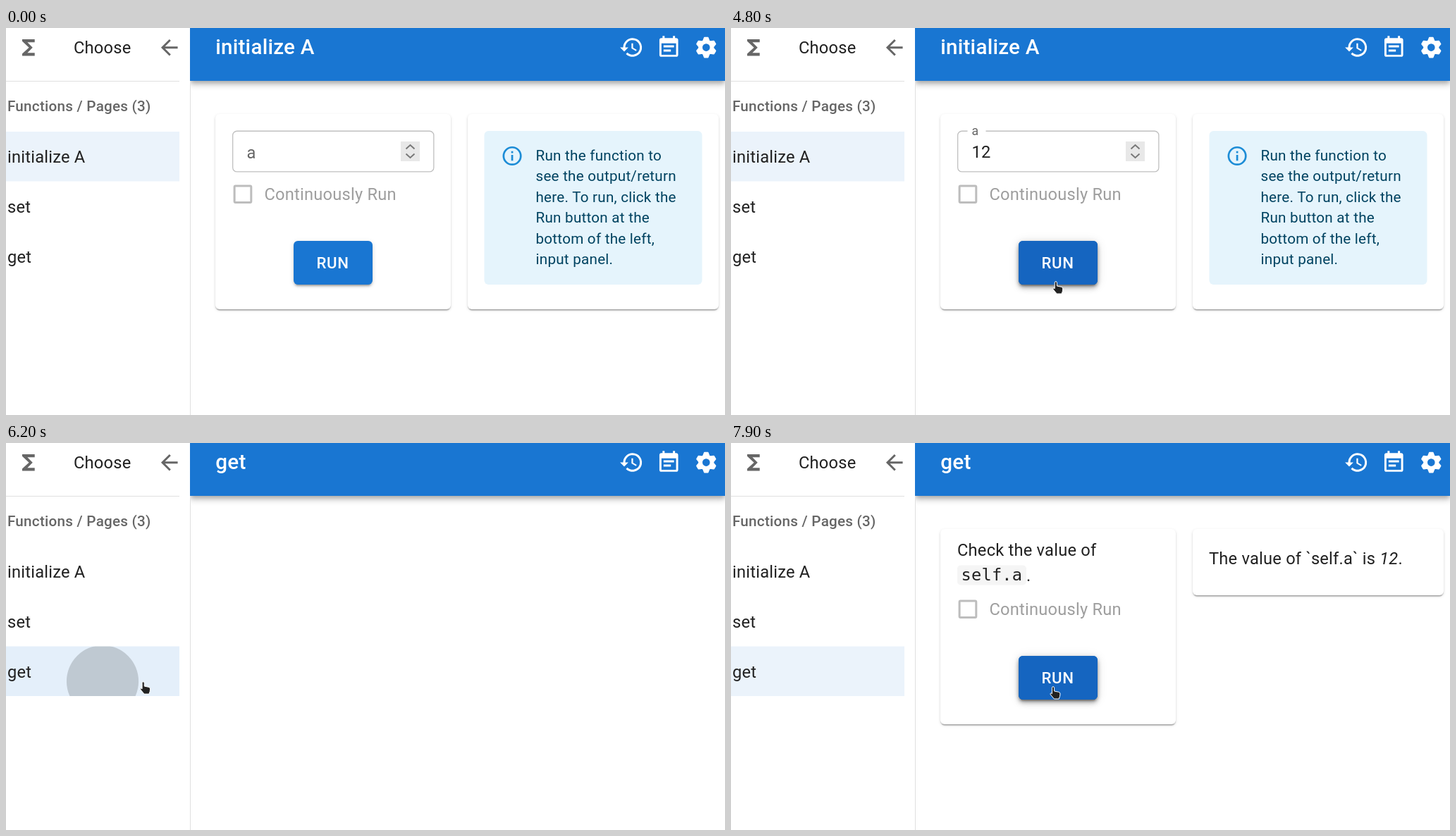
Write an HTML page that moves like this. It is 1020 by 549 pixels and loops after 8000 ms.

```html
<!DOCTYPE html>
<html lang="en">
<head>
<meta charset="utf-8">
<title>Function runner</title>
<style>
html, body { margin: 0; width: 100%; height: 100%; overflow: hidden; background: #fff; }
div, #art { position: absolute; box-sizing: border-box; }
#bar { left: 261px; top: 0; right: 0; height: 75px; background: #1976d2;
  box-shadow: 0 3px 6px -1.5px #0003, 0 6px 7.4px #00000024, 0 1.5px 15px #0000001f; }
#side { left: 0; top: 0; width: 261px; height: 100%; background: #fff; }
.card { top: 122px; height: 277px; background: #fff; border-radius: 6px;
  box-shadow: 0 3px 1.5px -1.5px #0003, 0 1.5px 1.5px #00000024, 0 1.5px 4.4px #0000001f; }
#inputCard { left: 297px; width: 334px; }
#outputCard { left: 655px; width: 356px; }
.button { left: 408px; top: 302px; width: 112px; height: 62px; border-radius: 6px; background: #1976d2;
  box-shadow: 0 4.4px 1.5px -3px #0003, 0 3px 3px #00000024, 0 1.5px 7.4px #0000001f; }
#hover { background: #1565c0;
  box-shadow: 0 3px 6px -1.5px #0003, 0 6px 7.4px #00000024, 0 1.5px 15px #0000001f; }
#art { left: 0; top: 0; width: 100%; height: 100%; overflow: hidden; }
text { font: 23.66px Roboto, sans-serif; letter-spacing: .00938em; fill: #212121; white-space: pre; }
text.title { font-size: 29.58px; font-weight: 500; letter-spacing: .0075em; fill: #fff; }
text.head { font-size: 20.7px; font-weight: 500; letter-spacing: .0107em; fill: #666; }
text.run { font-size: 22.2px; font-weight: 500; letter-spacing: .0286em; fill: #fff; }
#alert text { font-size: 20.7px; letter-spacing: .0107em; fill: #014361; }
text.code { font-family: "DejaVu Sans Mono", monospace; }
.pill { fill: #f5f5f5; }
</style>
</head>
<body>
<div id="bar"></div>
<div id="side"></div>
<div id="page">
  <div class="card" id="inputCard"></div>
  <div class="card" id="outputCard"></div>
  <div class="button"></div>
  <div class="button" id="hover"></div>
</div>

<svg id="art">
  <!-- sidebar -->
  <path d="M0 75.5H246M261.5 75V549" stroke="#e0e0e0"/>
  <rect id="rowInit" y="147" width="246" height="70.5" fill="#1976d2"/>
  <rect id="rowGet" y="288.5" width="246" height="70.5" fill="#1976d2"/>
  <svg y="288.5" width="246" height="70.5"><circle id="rowRipple" cx="137" cy="49.5"/></svg>
  <g fill="#666">
    <path transform="translate(14.1 10) scale(1.479)" d="M18 4H6v2l6.5 6L6 18v2h12v-3h-7l5-5-5-5h7z"/>
    <path transform="translate(214 10) scale(1.479)" d="M20 11H7.83l5.59-5.59L12 4l-8 8 8 8 1.41-1.41L7.83 13H20z"/>
  </g>
  <text x="96" y="36">Choose</text>
  <text class="head" x="2" y="118">Functions / Pages (3)</text>
  <text x="2" y="191">initialize A</text>
  <text x="2" y="262">set</text>
  <text x="2" y="333">get</text>

  <!-- app bar -->
  <text class="title" id="title" x="297.3" y="37"></text>
  <g fill="#fff">
    <path transform="translate(869.6 9.8) scale(1.479)" d="M13 3a9 9 0 0 0-9 9H1l3.9 3.9.1.1L9 12H6a7 7 0 1 1 2.06 4.94l-1.42 1.42A9 9 0 1 0 13 3zm-1 5v5l4.28 2.54.72-1.21-3.5-2.08V8z"/>
    <path transform="translate(922.5 9.8) scale(1.479)" d="M17 10H7v2h10zm2-7h-1V1h-2v2H8V1H6v2H5a2 2 0 0 0-2 2v14a2 2 0 0 0 2 2h14a2 2 0 0 0 2-2V5a2 2 0 0 0-2-2zm0 16H5V8h14zm-5-5H7v2h7z"/>
    <g id="gear" transform="translate(993.3 27.6) scale(1.479)">
      <circle r="5.5" fill="none" stroke="#fff" stroke-width="3.8"/>
    </g>
  </g>

  <g id="content">
    <rect x="324.1" y="223.9" width="23.7" height="23.7" rx="1.5" fill="none" stroke="#bdbdbd" stroke-width="3"/>
    <text x="366.5" y="244" style="fill:#9e9e9e">Continuously Run</text>
    <svg x="408" y="302" width="112" height="62"><circle id="runRipple" fill="#fff"/></svg>
    <text class="run" x="440.6" y="341">RUN</text>

    <g id="initForm">
      <rect id="border" rx="6" fill="none"/>
      <rect id="notch" y="143.5" height="5" fill="#fff"/>
      <text id="label">a</text>
      <text id="value" x="341.6" y="184"></text>
      <rect id="caret" y="162.5" width="1.6" height="27" fill="#111"/>
      <rect x="560" y="161" width="27" height="28" fill="#e8e8e8"/>
      <path d="M567.5 171.5l6-5.5 6 5.5M567.5 178.5l6 5.5 6-5.5" fill="none" stroke="#777" stroke-width="1.9"/>
    </g>
    <g id="getForm">
      <text x="321" y="160">Check the value of</text>
      <rect class="pill" x="321" y="173.5" width="98" height="28" rx="5"/>
      <text class="code" x="326.5" y="195">self.a</text>
      <text x="419" y="195.5">.</text>
    </g>

    <g id="alert">
      <rect x="678.5" y="146" width="309" height="218" rx="6" fill="#e5f4fc"/>
      <g transform="translate(701.8 165.2) scale(1.356)" fill="#1c8cd6">
        <circle cx="12" cy="12" r="9" fill="none" stroke="#1c8cd6" stroke-width="2"/>
        <path d="M11 7h2v2h-2zm0 4h2v6h-2z"/>
      </g>
    </g>
    <g id="initResult">
      <rect class="pill" x="678" y="150" width="98" height="28" rx="5"/>
      <text class="code" x="683.5" y="171.5">self.a</text>
      <text x="782" y="172">has been</text>
      <text x="678" y="207.5">initialized to 12</text>
    </g>
    <text id="getResult" x="678" y="172">The value of `self.a` is <tspan font-style="italic">12</tspan>.</text>
  </g>

  <!-- pointers, hot spot at 0,0 -->
  <g id="pointer" stroke="#fff" fill="#222" stroke-linejoin="round">
    <path id="arrow" d="M0 0V14.5l3.4-3 2.6 5.8 2.5-1.1L6 10.6h4.4z"/>
    <path id="hand" d="M-1.6 1.3a1.6 1.6 0 0 1 3.2 0V6l6 1.2q2.6.6 2.4 2.8l-.5 3.5-1.3 3.5H1.4l-5.2-6.2q-.8-2 1-2l1.2.9z"/>
    <g id="beam" fill="none">
      <path d="M-3-7.5H-1L0-6.5 1-7.5H3M0-6.5V6.5M-3 7.5H-1L0 6.5 1 7.5H3" stroke-width="3"/>
      <path d="M-3-7.5H-1L0-6.5 1-7.5H3M0-6.5V6.5M-3 7.5H-1L0 6.5 1 7.5H3" stroke="#222" stroke-width="1.2"/>
    </g>
  </g>
</svg>

<script>
const LOOP = 8000, FOCUS = 1880, BLUR = 4790, GET_CLICK = 6040, SWITCH = 6080;
const el = {};
document.querySelectorAll('[id]').forEach(node => el[node.id] = node);

const add = (parent, tag, attrs) => {
  const node = document.createElementNS('http://www.w3.org/2000/svg', tag);
  set(node, attrs);
  return parent.appendChild(node);
};
const set = (node, attrs) => { for (const key in attrs) node.setAttribute(key, attrs[key]); };
const show = (node, on) => node.style.display = on ? '' : 'none';
const clamp = x => Math.min(1, Math.max(0, x));
const within = (v, a, b) => v >= a && v < b;
const mix = (a, b, k) => a + (b - a) * k;

for (let i = 0; i < 6; i++)
  add(el.gear, 'path', { d: 'M-3.6-6L-2.3-9.4Q-2.1-10-1.6-10H1.6Q2.1-10 2.3-9.4L3.6-6z', transform: `rotate(${i * 60})` });
['Run the function to', 'see the output/return', 'here. To run, click the', 'Run button at the', 'bottom of the left,', 'input panel.']
  .forEach((line, i) => add(el.alert, 'text', { x: 751.5, y: 187.6 + i * 29.55 }).textContent = line);

// cubic-bezier(.4, 0, .2, 1)
function ease(x) {
  x = clamp(x);
  let lo = 0, hi = 1;
  for (let i = 0; i < 18; i++) {
    const s = (lo + hi) / 2, r = 1 - s;
    if (1.2 * r * r * s + .6 * r * s * s + s ** 3 < x) lo = s; else hi = s;
  }
  return lo * lo * (3 - 2 * lo);
}
const pulse = (t, from, to, fade) => ease((t - from) / fade) - ease((t - to) / fade);

// time, x, y
const path = [
  [900, 317, 376], [1300, 352, 285], [1700, 401.3, 199.5], [3100, 401.3, 199.5], [3890, 429, 230], [4350, 455, 318],
  [4700, 461, 360], [5250, 460, 360], [5600, 141, 339], [5700, 137, 338], [6110, 137, 338],
  [6200, 194, 339], [6500, 393, 358], [6900, 407, 354], [7100, 470, 333], [7800, 470, 333], [7900, 457, 346]
];
function pointerAt(t) {
  const i = path.findIndex(p => p[0] > t);
  if (i < 0) return path[path.length - 1].slice(1);
  if (i === 0) return path[0].slice(1);
  const [a, b] = [path[i - 1], path[i]];
  const k = (t - a[0]) / (b[0] - a[0]);
  return [mix(a[1], b[1], k), mix(a[2], b[2], k)];
}

function ripple(node, t, start, release, radius) {
  const grow = ease((t - start) / 550);
  set(node, { r: t < start ? 0 : radius * grow, opacity: (.1 + .2 * grow) * (1 - ease((t - release) / 550)) });
}

function draw() {
  const t = performance.now() % LOOP;
  const onGet = t >= SWITCH;
  const [x, y] = pointerAt(t);
  const overField = !onGet && t >= 900 && within(x, 321, 608) && within(y, 146, 205);
  const overButton = within(x, 408, 520) && within(y, 302, 364);
  const overRow = x < 246 && within(y, 147, 359);

  // pages
  el.title.textContent = onGet ? 'get' : 'initialize A';
  const loaded = !within(t, SWITCH, 6350);
  show(el.page, loaded);
  show(el.content, loaded);
  show(el.initForm, !onGet);
  show(el.getForm, onGet);
  const initDone = within(t, 4980, SWITCH), getDone = t >= 7420;
  show(el.initResult, initDone);
  show(el.getResult, getDone);
  show(el.alert, !initDone && !getDone);
  el.outputCard.style.height = (initDone ? 129 : getDone ? 94 : 277) + 'px';

  // sidebar rows
  const chosen = ease((t - SWITCH) / 150);
  set(el.rowInit, { opacity: .085 * (1 - chosen) });
  set(el.rowGet, { opacity: chosen * (.085 + .035 * (1 - ease((t - 6240) / 150))) });
  ripple(el.rowRipple, t, GET_CLICK, 6130, 147);

  // button
  el.hover.style.opacity = pulse(t, 4300, 5290, 250) + ease((t - 6910) / 250);
  const second = t > 6500;
  set(el.runRipple, second ? { cx: 62, cy: 31 } : { cx: 52, cy: 58 });
  ripple(el.runRipple, t, second ? 7200 : 4760, second ? 7300 : 4860, 84);

  // number field
  const focused = within(t, FOCUS, BLUR);
  const line = focused ? 3 : 1.3, top = focused ? 145 : 145.6;
  set(el.border, {
    x: 321 + line / 2, y: top + line / 2, width: 286.5 - line, height: 204.6 - top - line, 'stroke-width': line,
    stroke: focused ? '#1976d2' : overField ? '#212121' : '#c0c0c0'
  });
  const lift = ease((t - FOCUS) / 200), gap = 26 * ease((t - FOCUS) / 100);
  set(el.notch, { x: 348.5 - gap / 2, width: gap });
  set(el.label, { transform: `translate(341.5 ${mix(185, 152, lift)}) scale(${mix(1, .75, lift)})` });
  el.label.style.fill = focused ? '#1976d2' : '#666';
  const digits = t < 3090 ? 0 : t < 3240 ? 1 : 2;
  el.value.textContent = '12'.slice(0, digits);
  set(el.caret, { x: 341.6 + digits * 13.6 });
  show(el.caret, focused && !within(t, 4050, 4550));

  // pointer
  show(el.pointer, t >= 900 && !within(t, 3090, 3890));
  set(el.pointer, { transform: `translate(${x} ${y})` });
  const hand = overButton || overRow;
  show(el.beam, overField);
  show(el.hand, !overField && hand);
  show(el.arrow, !overField && !hand);
  requestAnimationFrame(draw);
}
draw();
</script>
</body>
</html>
```
